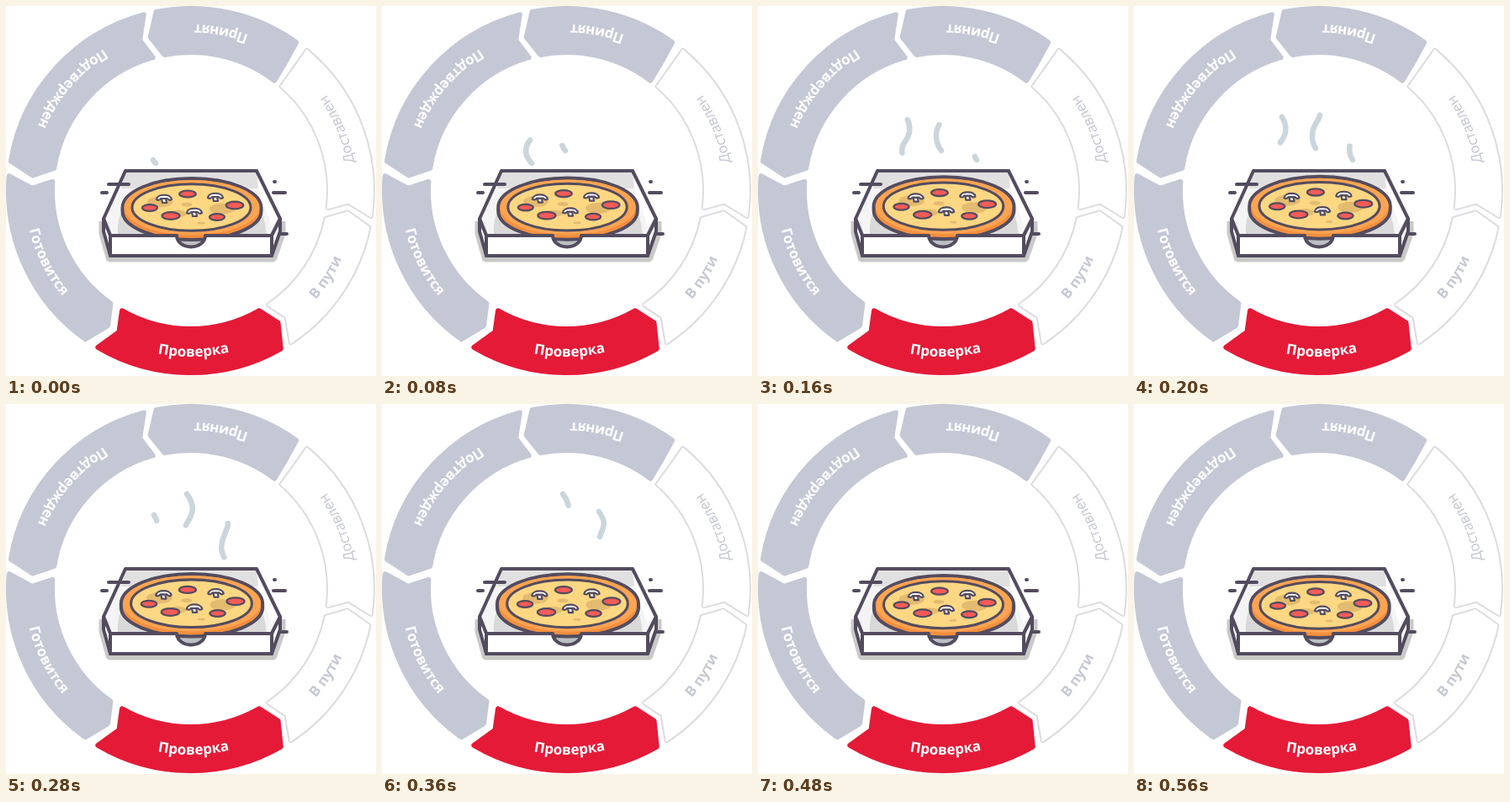
An HTML page that plays this animation: 440x440 px, repeating every 0.6 s.

```html
<!DOCTYPE html>
<html lang="ru">
<head>
<meta charset="utf-8">
<style>
  html, body { margin: 0; width: 100%; height: 100%; overflow: hidden; background: #fff; }
  svg { display: block; }
  text { font: 700 17px "Noto Sans", "Open Sans", sans-serif; text-anchor: middle; }
  .ink { stroke: #534c5f; stroke-width: 4; stroke-linejoin: round; stroke-linecap: round; }
  .thin { stroke-width: 2.2; }
  #steam { fill: none; stroke: #cbd5dc; stroke-width: 6.5; stroke-linecap: round; }
</style>
</head>
<body>
<svg width="440" height="440" viewBox="0 0 440 440">
  <defs>
    <g id="mushroom" class="ink thin" fill="#fff">
      <path d="M-3 0L-2 5H3L2 0Z"/>
      <path d="M-9 1C-8-6 8-6 9 1Q6 3 4 0H-4Q-6 3-9 1Z"/>
    </g>
  </defs>
  <g id="ring"></g>

  <path d="M116 256V270L124 299H317L327 270V256" fill="#c9c9c7" stroke="#c9c9c7" stroke-width="11" stroke-linejoin="round"/>
  <path d="M142 196H298L326 253 316 273H124L116 253Z" fill="#f4f4f4"/>
  <path d="M142 196H298L303 217H137Z" fill="#e1e0e0"/>
  <path d="M298 196L326 253 316 262 300 217Z" fill="#fff"/>
  <path d="M133 262Q134 246 142 238H300Q308 250 310 273H133Z" fill="#dad9d9"/>
  <path d="M142 196H298L326 253 316 273H124L116 253Z" fill="none" class="ink"/>
  <ellipse cx="220" cy="274" rx="17" ry="13" fill="#bcc0c2"/>

  <g id="pizza">
    <path class="ink" fill="#f58f3e" d="M138.5 240A82.5 35 0 0 1 303.5 240V244A82.5 34 0 0 1 138.5 244Z"/>
    <ellipse cx="221" cy="239.5" rx="80.5" ry="32.5" fill="#fda452"/>
    <ellipse class="ink" cx="220.5" cy="239.5" rx="70.5" ry="27.8" fill="#fed783" style="stroke-width:3"/>
    <g id="spots" fill="#e3bb70"></g>
    <g id="salami" fill="#f55b57" class="ink thin"></g>
    <use href="#mushroom" x="188" y="229"/>
    <use href="#mushroom" x="249" y="227"/>
    <use href="#mushroom" x="224" y="245"/>
  </g>

  <g class="ink" fill="#fff">
    <path d="M116 253V268L124 297V273ZM326 253V268L316 297V273Z"/>
    <path d="M124 273H203A17 13.5 0 0 0 237 273H316V297H124Z"/>
    <path d="M122 212H146M114 222H120M319 209H320M318 222H332M326 271H334"/>
  </g>
  <g id="steam">
    <path d="M178 187C169 177 170 168 175 161S184 145 176 132"/>
    <path d="M218 172C210 162 211 149 215 142S228 124 215 107"/>
    <path d="M260 183C254 174 256 165 260 155S267 141 258 128"/>
  </g>
</svg>
<script>
const $ = id => document.getElementById(id);
const C = 219.5, OUTER = 216.5, INNER = 164.5, TIP = 188.5;

// Angles are in degrees, counterclockwise from the top.
const at = (r, deg) => {
  const a = deg * Math.PI / 180;
  return `${(C - r * Math.sin(a)).toFixed(2)} ${(C - r * Math.cos(a)).toFixed(2)}`;
};

// Each edge holds its outer, tip and inner angles; the 6px stroke rounds the corners.
function segment([so, st, si], [eo, et, ei]) {
  return `M${at(OUTER, so)}A${OUTER} ${OUTER} 0 0 0 ${at(OUTER, eo)}L${at(TIP, et)} ${at(INNER, ei)}` +
    `A${INNER} ${INNER} 0 0 1 ${at(INNER, si)}L${at(TIP, st)}Z`;
}

const DONE = '#c4c8d5', ACTIVE = '#e41a37', LINE = '#dcdce0';
const steps = [
  ['Принят', -36.4, 11.8, DONE],
  ['Подтвержден', 14, 81.6, DONE],
  ['Готовится', 84.5, 145.6, DONE],
  ['Проверка', 148.5, 210.6, ACTIVE],
  ['В пути', 212.5, 259.2, LINE, 600, '#c6c8d4'],
  ['Доставлен', 261, 321.2, LINE, 400, '#c6c8d4'],
];

$('ring').innerHTML = steps.map(([label, from, to, color, weight = 700, ink = '#fff'], i) => {
  const s = from + .9, e = to - .9, mid = (from + to) / 2 + 1.5;
  const d = segment(
    i ? [s, s + 3.8, s + .9] : [s, s - 1, s - 1.8],
    i < 5 ? [e, e + 3.8, e] : [e, e - .7, e - 1.4]);
  const hollow = color === LINE ? `<path d="${d}" fill="#fff" stroke="#fff" stroke-width="2"/>` : '';
  return `<path d="${d}" fill="${color}" stroke="${color}" stroke-width="6" stroke-linejoin="round"/>${hollow}
    <path id="arc${i}" d="M${at(197.5, mid - 40)}A197.5 197.5 0 0 0 ${at(197.5, mid + 40)}" fill="none"/>
    <text fill="${ink}" style="font-weight:${weight}"><textPath href="#arc${i}" startOffset="50%">${label}</textPath></text>`;
}).join('');

const ovals = list => list.map(([x, y, rx, ry]) => `<ellipse cx="${x}" cy="${y}" rx="${rx}" ry="${ry}"/>`).join('');
$('spots').innerHTML = ovals([[183, 233, 15, 6.5], [257, 241, 15, 6.5], [215, 236, 6.5, 2.5], [232, 258, 4.5, 1.5], [204, 247, 11, 4]]);
$('salami').innerHTML = ovals([[171, 240, 9, 3.8], [196, 249.5, 10.5, 4.3], [216, 223.5, 9.8, 4], [272, 237, 10.3, 4.3], [251, 251, 9, 3.8]]);

const puffs = [...$('steam').children], starts = [-15, 58, 146], LENGTH = 42;
puffs.forEach(p => p.setAttribute('stroke-dasharray', `${LENGTH} 999`));

function draw(now) {
  const t = Math.floor(now % 600 / 40) * 40;
  const rise = (1 - Math.cos(t / 300 * Math.PI)) / 2;
  $('pizza').setAttribute('transform',
    `translate(221 ${241 - 2.3 * rise}) scale(${1 + .02 * rise}) translate(-221 -241)`);
  puffs.forEach((p, i) => p.setAttribute('stroke-dashoffset', LENGTH - .32 * (t - starts[i])));
  requestAnimationFrame(draw);
}
draw(0);
</script>
</body>
</html>
```
